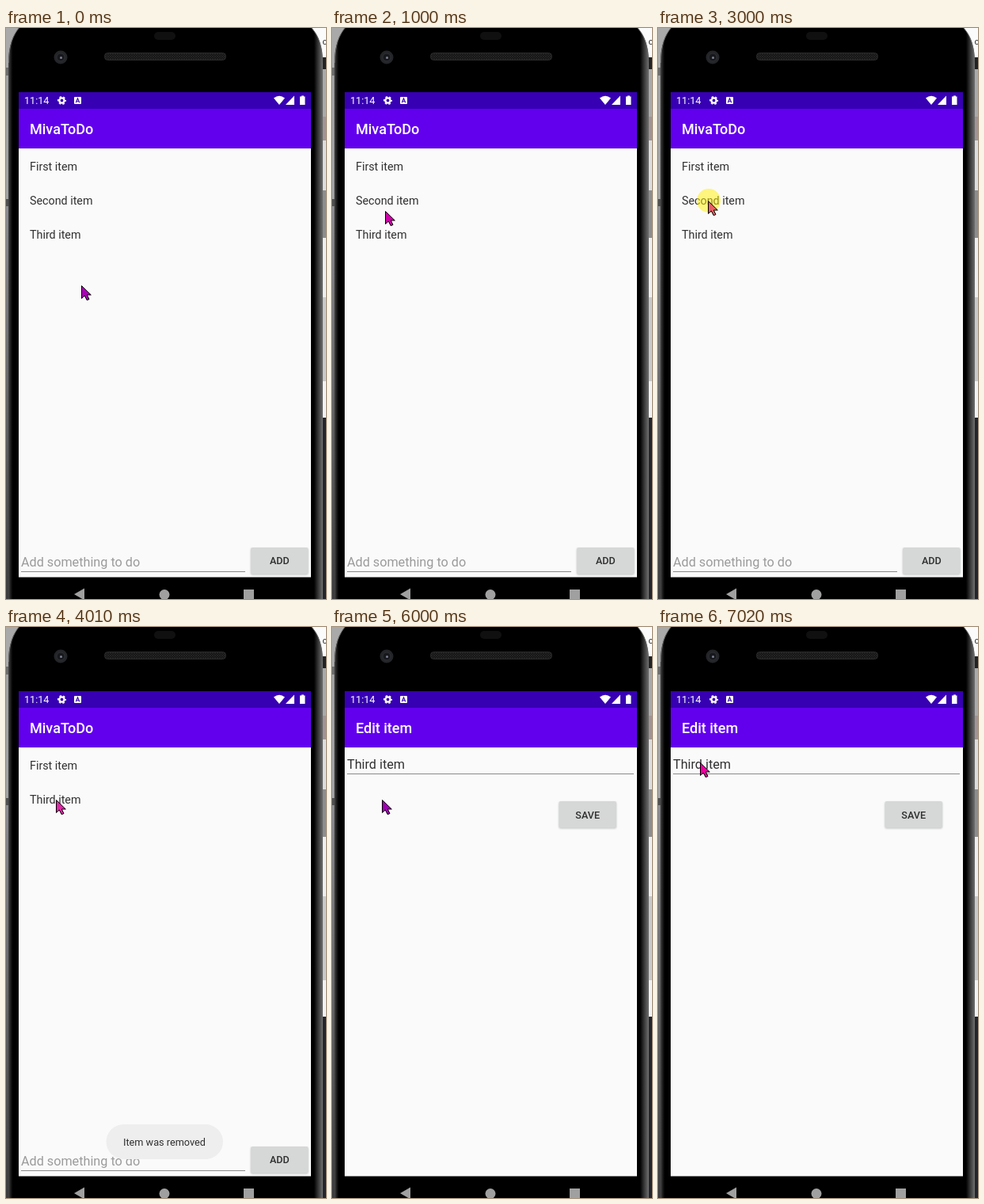
Animation of 404x721 px, one loop 8000 ms. Source, as an HTML page:

```html
<!DOCTYPE html>
<html lang="en">
<head>
<meta charset="utf-8">
<title>To-do list demo</title>
<style>
  html, body { margin: 0; width: 100%; height: 100%; overflow: hidden; background: #000; }
  svg { display: block; }
  text { font-family: Roboto, "Noto Sans", sans-serif; fill: #303030; white-space: pre; }
  .item { font-size: 14.3px; }
  .title { font-size: 18px; font-weight: 500; fill: #fff; }
  .field { font-size: 16.2px; }
  .hint { fill: #9b9b9b; }
  .small { font-size: 12.6px; }
  .toast { font-size: 12.7px; }
  .button { font-size: 12.6px; font-weight: 500; text-anchor: middle; }
  .rule { stroke: #8a8a8a; stroke-width: 1; }
  .face { fill: #d6d7d7; filter: drop-shadow(0 1px 1px rgba(0, 0, 0, .22)); }
</style>
</head>
<body>
<svg width="404" height="721" viewBox="0 0 404 721">
  <defs>
    <linearGradient id="rim" gradientUnits="userSpaceOnUse" x1="3" x2="400">
      <stop offset="0" stop-color="#484848"/>
      <stop offset=".008" stop-color="#181818"/>
      <stop offset=".014" stop-color="#000"/>
      <stop offset=".972" stop-color="#000"/>
      <stop offset=".986" stop-color="#3a3a3a"/>
      <stop offset="1" stop-color="#707070"/>
    </linearGradient>
    <linearGradient id="dusk" x2="0" y2="1">
      <stop offset="0" stop-color="#8c8c90"/>
      <stop offset="1" stop-color="#3c3c3e"/>
    </linearGradient>
    <pattern id="mesh" width="3" height="3" patternUnits="userSpaceOnUse">
      <rect width="3" height="3" fill="#141414"/>
      <path d="M0 0L3 3M3 0L0 3" stroke="#2a2a2a" stroke-width=".7"/>
    </pattern>
  </defs>

  <!-- desktop behind the phone -->
  <g id="desktop"></g>
  <text x="399.5" y="21" font-size="11">c</text>

  <!-- phone body -->
  <path d="M18 -2C9 8 3 22 3 44V723H400V44C400 22 394 8 384 -2Z" fill="url(#rim)"/>
  <path d="M18 -2C9 8 3.5 22 3.5 44M384 -2C394 8 399.5 22 399.5 44" fill="none" stroke="#666"/>
  <rect x="187" y="5" width="27" height="10" rx="5" fill="#101010"/>
  <rect x="124.500" y="31.500" width="153" height="9" rx="4" fill="url(#mesh)" stroke="#2b2b2b"/>
  <circle cx="69" cy="37" r="8.500" fill="#242528"/>
  <circle cx="69" cy="37" r="5" fill="#17181c" stroke="#303136"/>
  <circle cx="69.500" cy="37.500" r="1.500" fill="#7c7f92"/>

  <!-- screen -->
  <rect x="16" y="81" width="369" height="612.500" fill="#fafafa"/>
  <rect x="16" y="152" width="369" height="1" fill="#e6e4ea"/>
  <rect x="16" y="81" width="369" height="21" fill="#3700b3"/>
  <rect x="16" y="102" width="369" height="50" fill="#6200ee"/>

  <!-- status bar -->
  <text class="small" x="23" y="96.300" style="fill:#fff">11:14</text>
  <g fill="none" stroke="#fff">
    <circle cx="70.500" cy="91.500" r="3.100" stroke-width="2.400"/>
    <circle cx="70.500" cy="91.500" r="4.700" stroke-width="1.600" stroke-dasharray="2.500 2.422" stroke-dashoffset="1.250"/>
  </g>
  <rect x="86" y="87" width="9" height="9" rx="1" fill="#fff"/>
  <path d="M88.300 94.300L90.500 88.700L92.700 94.300M89.200 92.700H91.800" fill="none" stroke="#3700b3" stroke-width="1.100"/>
  <path d="M338 88.500Q345 83 352 88.500L345 97ZM364 85.500V97H353Z" fill="#fff"/>
  <path d="M371 86.500H373V85.500H376V86.500H377.500V97H371Z" fill="#fff"/>

  <!-- list page -->
  <g id="list">
    <text class="title" x="30" y="134.300">MivaToDo</text>
    <text class="item" x="30" y="179.600">First item</text>
    <text class="item" x="30" y="222.600" id="second"></text>
    <text class="item" x="30" y="265.600" id="third">Third item</text>
    <text class="field hint" x="19" y="679.500">Add something to do</text>
    <path class="rule" d="M19 686.500H302"/>
    <rect class="face" x="309" y="656" width="72.500" height="33.500" rx="2"/>
    <text class="button" x="345.300" y="677.200">ADD</text>
    <g id="toast">
      <rect x="126.500" y="628" width="147.500" height="44" rx="22" fill="#eee"/>
      <text class="toast" x="148" y="655">Item was removed</text>
    </g>
  </g>

  <!-- edit page -->
  <g id="edit">
    <text class="title" x="30" y="134.300">Edit item</text>
    <text class="field" x="19" y="178.500">Third item</text>
    <path class="rule" d="M19 185.500H381"/>
    <rect class="face" x="286.500" y="220" width="72.500" height="33.500" rx="2"/>
    <text class="button" x="322.700" y="241.700">SAVE</text>
  </g>

  <!-- navigation -->
  <g fill="#a0a0a0">
    <path d="M86 715L99 707.500V722.500Z"/>
    <circle cx="200" cy="715.500" r="6.500"/>
    <rect x="300" y="709" width="13" height="13"/>
  </g>

  <!-- pointer -->
  <circle id="press" cx="64" cy="218" r="15" fill="#fff000" opacity=".5"/>
  <path id="pointer" d="M.5 .5V16.500L4.300 13L7.200 18.700L10 17.500L7.300 12H12.300Z" stroke="#000" stroke-linejoin="round"/>
</svg>
<script>
const LOOP = 8000;
const $ = id => document.getElementById(id);

// Strips of desktop: x, y, width, height, fill
const strips = [
  [0, 0, 40, 50, '#a9a9a9'], [0, 50, 8, 10, '#6c6c6c'], [0, 60, 8, 156, '#a2a2a4'],
  [0, 216, 8, 9, '#505050'], [0, 225, 8, 496, 'url(#dusk)'],
  [364, 0, 40, 37, '#fbfbfb'], [396, 37, 8, 15, '#222'], [396, 52, 8, 60, '#aaa'],
  [396, 112, 8, 30, '#a39494'], [396, 142, 8, 63, '#ddd'], [396, 205, 8, 60, '#8d8d8d'],
  [396, 265, 8, 75, '#eee'], [396, 340, 8, 106, '#c9c9c9'], [396, 446, 8, 46, '#f2f2f2'],
  [396, 492, 8, 229, '#24242c'],
];
for (const [x, y, width, height, fill] of strips) {
  const rect = document.createElementNS('http://www.w3.org/2000/svg', 'rect');
  for (const [name, value] of Object.entries({ x, y, width, height, fill })) rect.setAttribute(name, value);
  $('desktop').append(rect);
}

const steps = [
  { at: 0, x: 95, y: 325, color: '#a800b4' },
  { at: 1000, x: 67, y: 231, color: '#d000aa' },
  { at: 1980, x: 63, y: 218, color: '#ed109f' },
  { at: 3000, x: 63, y: 218, color: '#e95f66', press: true },
  { at: 4010, x: 63, y: 218, color: '#e028a8', removed: true },
  { at: 5010, x: 63, y: 218, color: '#e95f66', press: true, removed: true },
  { at: 6000, x: 63, y: 218, color: '#a000b4', editing: true },
  { at: 7020, x: 53, y: 171, color: '#f000a0', editing: true },
];

const show = (id, on) => $(id).setAttribute('visibility', on ? 'inherit' : 'hidden');

function draw(step) {
  show('list', !step.editing);
  show('edit', step.editing);
  show('third', !step.removed);
  show('toast', step.removed);
  show('press', step.press);
  $('second').textContent = step.removed ? 'Third item' : 'Second item';
  $('pointer').setAttribute('transform', `translate(${step.x} ${step.y})`);
  $('pointer').setAttribute('fill', step.color);
}

const start = performance.now();
let current;
function tick(now) {
  const time = Math.max(0, now - start) % LOOP;
  const step = steps.findLast(s => s.at <= time);
  if (step !== current) draw(current = step);
  requestAnimationFrame(tick);
}
tick(start);
</script>
</body>
</html>
```
